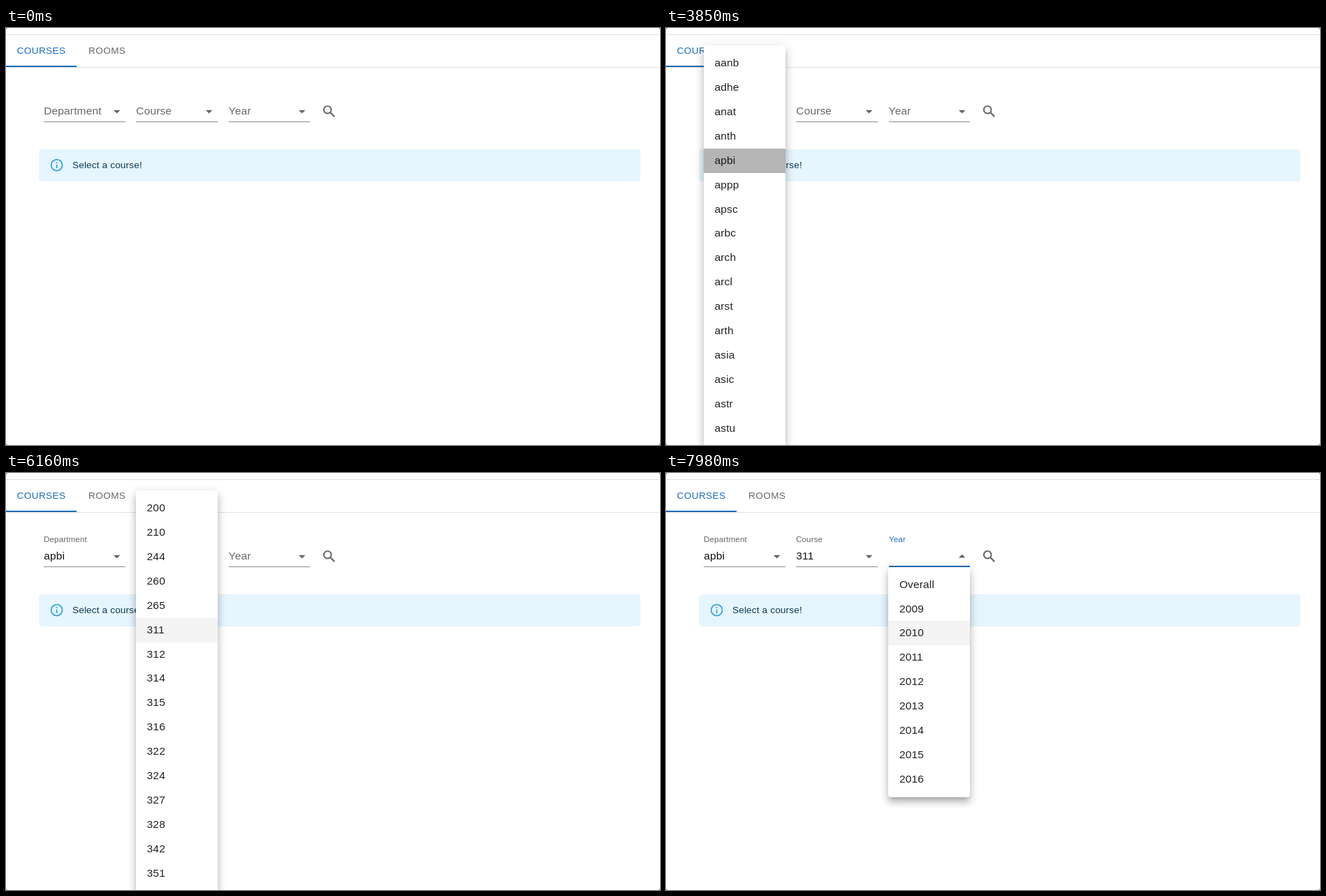
An HTML page for the animation above (8 s loop, 936 px wide and 598 px high).

```html
<!DOCTYPE html>
<html lang="en">
<head>
<meta charset="utf-8">
<title>Course search</title>
<style>
  html, body { margin: 0; width: 100%; height: 100%; overflow: hidden; background: #777; }
  #stage {
    position: relative; width: 936px; height: 598px; overflow: hidden;
    background: #fff; border-radius: 3px;
    font: 15.5px/22px "Liberation Sans", Arial, sans-serif;
    letter-spacing: .146px; color: rgba(0, 0, 0, .87); white-space: pre;
    --blue: #1b6cb8;
  }
  #stage div, #stage svg { position: absolute; }
  .rule { left: 0; width: 936px; height: 1px; background: #e0e0e0; }
  .tab { top: 22px; font-size: 13.6px; letter-spacing: .39px; color: #666; }
  .tab.on { color: var(--blue); }
  .mark { left: 0; top: 54px; width: 101px; height: 2px; background: var(--blue); }
  .alert { left: 47px; top: 174px; width: 861px; height: 46px; border-radius: 4px; background: #e6f5fe; }
  .alert div { left: 48px; top: 12px; font-size: 13.6px; color: #0a3a52; }
  .field { top: 0; width: 116.4px; }
  .label { left: 0; top: 107.5px; transform-origin: 0 50%; }
  .value { left: 0; top: 108px; color: #111; }
  .line { left: 0; top: 134px; width: 100%; height: 1px; background: rgba(0, 0, 0, .45); }
  .hover, .focus { left: 0; top: 133px; width: 100%; height: 2px; }
  .hover { background: #222; }
  .focus { background: var(--blue); }
  .menu {
    width: 116.8px; overflow: hidden; border-radius: 4px; background: #fff;
    box-shadow: 0 5px 5px -3px rgba(0,0,0,.2), 0 8px 10px 1px rgba(0,0,0,.14), 0 3px 14px 2px rgba(0,0,0,.12);
  }
  .row { left: 0; width: 100%; height: 34.93px; line-height: 34.93px; text-indent: 15.5px; overflow: hidden; }
  .ripple { border-radius: 50%; background: rgba(0, 0, 0, .87); }
</style>
</head>
<body>
<div id="stage">
  <div class="rule" style="top:9px"></div>
  <div class="rule" style="top:56px"></div>
  <div class="mark"></div>
  <div class="tab on" style="left:15.5px">COURSES</div>
  <div class="tab" style="left:118px">ROOMS</div>
  <svg style="left:450.6px;top:108px" width="23.3" height="23.3" viewBox="0 0 24 24" fill="none" stroke="#666" stroke-width="2">
    <circle cx="9.5" cy="9.5" r="5.5"/><path d="M14 14l5.7 5.7" stroke-width="2.2"/>
  </svg>
  <div class="alert">
    <svg style="left:15.3px;top:12.3px" width="21.3" height="21.3" viewBox="0 0 24 24" fill="none" stroke="#34a4dc" stroke-width="2">
      <circle cx="12" cy="12" r="9"/><path d="M12 7v2M12 11v6"/>
    </svg>
    <div>Select a course!</div>
  </div>
</div>
<script>
const LOOP = 8000, STEP = 70, ROW = 34.93, PAD = 7.8;
const stage = document.getElementById('stage');

function bezier(x1, y1, x2, y2) {
  const axis = (a, b, u) => 3 * a * u * (1 - u) ** 2 + 3 * b * u * u * (1 - u) + u ** 3;
  return x => {
    if (x <= 0) return 0;
    if (x >= 1) return 1;
    let lo = 0, hi = 1;
    for (let i = 0; i < 24; i++) {
      const mid = (lo + hi) / 2;
      if (axis(x1, x2, mid) < x) lo = mid; else hi = mid;
    }
    return axis(y1, y2, lo);
  };
}
const standard = bezier(.4, 0, .2, 1);
const easeOut = bezier(0, 0, .2, 1);

// Each event is [first visible time, ms already elapsed by then].
const since = (now, [first, lag]) => now < first ? 0 : now - first + lag;
const NEVER = [Infinity, 0];

const fields = [
  {
    name: 'Department', x: 54.2, top: 25.2, height: 589, grow: 374, originY: 134,
    items: 'aanb adhe anat anth apbi appp apsc arbc arch arcl arst arth asia asic astr astu audi'.split(' '),
    hoverAt: 1330, open: [2240, 65], close: [4410, 35], blur: [5460, 135],
    pick: 4, press: [3430, 60], pressX: 58, focusRow: 0,
    path: [[2380, 2], [2870, 3], [3080, 4]]
  },
  {
    name: 'Course', x: 186.3, top: 25.2, height: 589, grow: 374, originY: 134,
    items: '200 210 244 260 265 311 312 314 315 316 322 324 327 328 342 351 360'.split(' '),
    hoverAt: 5110, open: [5460, 135], close: [6510, 35], blur: [7140, 100],
    pick: 5, press: [6160, 10], pressX: 57, focusRow: -1,
    path: [[5530, 2], [5810, 4], [5880, 5]]
  },
  {
    name: 'Year', x: 318.6, top: 134.8, height: 330, grow: 319, originY: 134.8,
    items: ['Overall', ...Array.from({ length: 8 }, (_, i) => String(2009 + i))],
    hoverAt: 6930, open: [7140, 100], close: NEVER, blur: NEVER,
    pick: -1, press: NEVER, pressX: 0, focusRow: -1,
    path: [[7490, 0], [7560, 1], [7700, 2]]
  }
];

function add(parent, cls, text = '') {
  const el = document.createElement('div');
  el.className = cls;
  el.textContent = text;
  parent.append(el);
  return el;
}

function buildField(f) {
  const box = add(stage, 'field');
  box.style.left = f.x + 'px';
  f.label = add(box, 'label', f.name);
  f.value = add(box, 'value', f.items[f.pick] || '');
  for (const part of ['line', 'hover', 'focus']) f[part] = add(box, part);
  box.insertAdjacentHTML('beforeend',
    '<svg style="left:93.2px;top:107.5px" width="23.3" height="23.3" viewBox="0 0 24 24" fill="#666"><path d="M7 10l5 5 5-5z"/></svg>');
  f.arrow = box.lastChild;
}

function buildMenu(f) {
  f.menu = add(stage, 'menu');
  Object.assign(f.menu.style, {
    left: f.x - .2 + 'px', top: f.top + 'px', height: f.height + 'px',
    transformOrigin: `50% ${f.originY - f.top}px`
  });
  f.rows = f.items.map((text, i) => {
    const row = add(f.menu, 'row', text);
    row.style.top = PAD + i * ROW + 'px';
    return row;
  });
  if (f.pick < 0) return;
  f.ripple = add(f.rows[f.pick], 'ripple');
  const reach = Math.max(f.pressX, 116.8 - f.pressX);
  const r = Math.hypot(reach + 1, ROW / 2 + 1);
  Object.assign(f.ripple.style, {
    left: f.pressX - r + 'px', top: ROW / 2 - r + 'px', width: 2 * r + 'px', height: 2 * r + 'px'
  });
}

function drawField(f, now) {
  const opened = now >= f.open[0], closed = now >= f.close[0], blurred = now >= f.blur[0];
  const lift = easeOut(since(now, f.open) / 200);
  f.label.style.transform = `translateY(${-23.8 * lift}px) scale(${1 - .25 * lift})`;
  f.label.style.color = opened && !blurred ? 'var(--blue)' : '#666';
  f.value.style.visibility = closed ? 'visible' : 'hidden';
  f.focus.style.transform = `scaleX(${lift - easeOut(since(now, f.blur) / 200)})`;
  const over = now >= f.hoverAt && !opened;
  f.hover.style.opacity = over ? (now < f.hoverAt + STEP ? .5 : 1) : 0;
  f.arrow.style.transform = opened && !closed ? 'rotate(180deg)' : '';
}

function rowColor(f, i, hovered, now) {
  if (i === f.pick && now >= f.close[0]) return 'rgba(25,118,210,.08)';
  if (i === f.focusRow && now < f.press[0]) return 'rgba(0,0,0,.12)';
  return i === hovered ? 'rgba(0,0,0,.045)' : 'transparent';
}

function drawMenu(f, now) {
  const tIn = since(now, f.open), tOut = since(now, f.close), d = f.grow;
  const alpha = standard(tIn / d) - standard(tOut / d);
  f.menu.style.visibility = alpha > .004 ? 'visible' : 'hidden';
  f.menu.style.opacity = alpha;
  const s = .75 + .25 * (standard(tIn / (d * .666)) - standard((tOut - d * .333) / (d * .666)));
  f.menu.style.transform = s > .9999 ? 'none' : `scale(${s}, ${s * s})`;

  const step = f.path.filter(([at]) => now >= at).pop();
  const hovered = step ? step[1] : -1;
  f.rows.forEach((row, i) => { row.style.background = rowColor(f, i, hovered, now); });

  if (f.ripple) {
    const spread = standard(since(now, f.press) / 550);
    f.ripple.style.transform = `scale(${spread})`;
    f.ripple.style.opacity = (.1 + .2 * spread) * (1 - standard(tOut / 550));
  }
}

fields.forEach(buildField);
fields.forEach(buildMenu);

const start = performance.now();
function frame() {
  const t = (performance.now() - start) % LOOP;
  const now = Math.floor(t / STEP) * STEP;
  for (const f of fields) {
    drawField(f, now);
    drawMenu(f, now);
  }
  requestAnimationFrame(frame);
}
frame();
</script>
</body>
</html>
```
